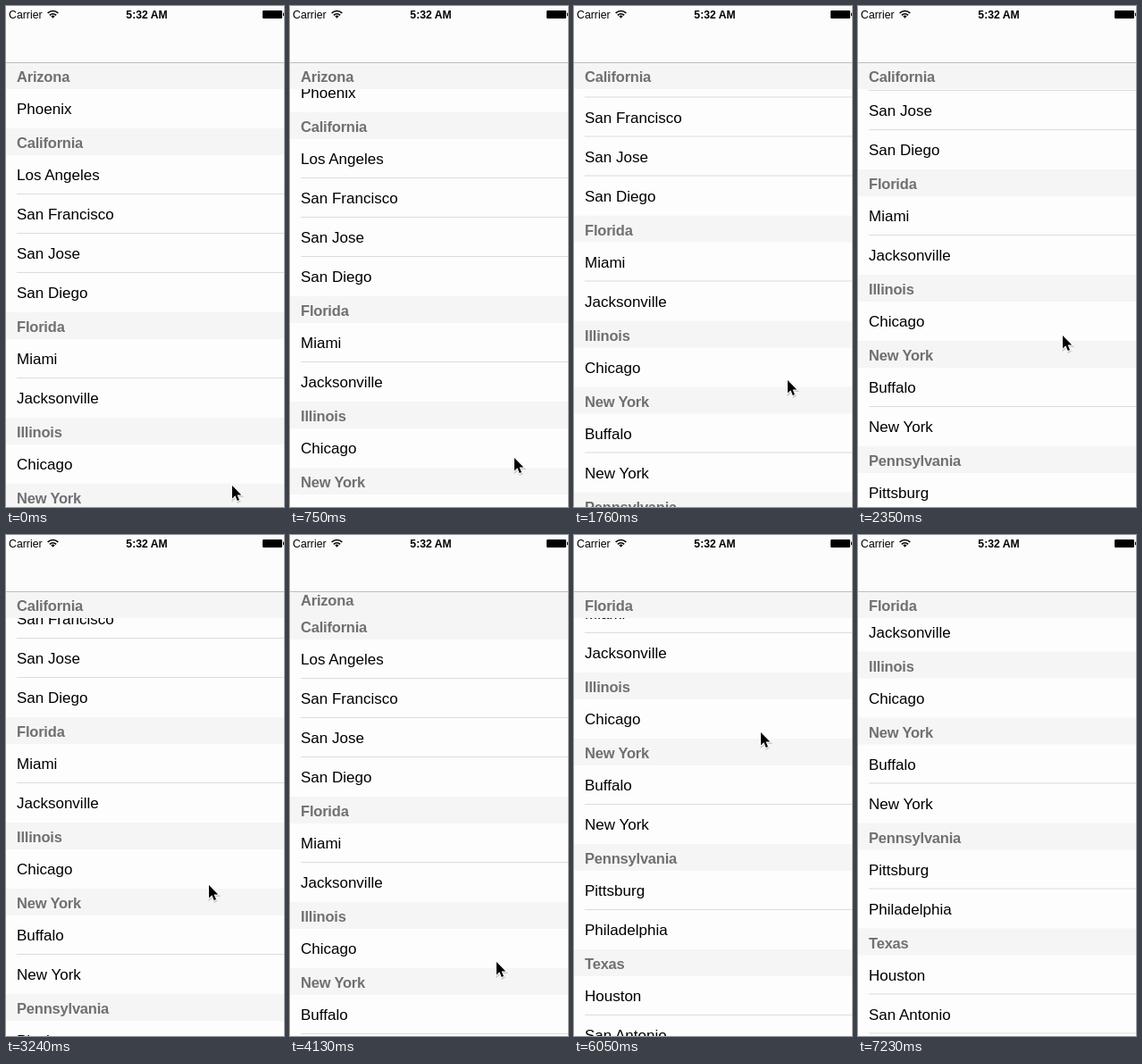
An HTML page for the animation above (7830 ms loop, 311x561 px).

```html
<!DOCTYPE html>
<html lang="en">
<head>
<meta charset="utf-8">
<title>City list</title>
<style>
  html, body { margin: 0; width: 100%; height: 100%; overflow: hidden; background: #fdfdfd; }
  svg { display: block; width: 311px; height: 561px; }
  text { font-family: "Liberation Sans", Arial, sans-serif; font-size: 17px; }
  .head text { font-size: 16.5px; font-weight: bold; letter-spacing: -.2px; fill: #707073; }
</style>
</head>
<body>
<svg viewBox="0 0 311 561">
  <rect width="311" height="561" fill="#fdfdfd"/>
  <g id="rows"></g>
  <g id="heads"></g>
  <rect width="311" height="63" fill="#fcfcfc"/>
  <rect y="63" width="311" height="1" fill="#bdbdbd"/>
  <text x="3" y="13.5" style="font-size:12.3px">Carrier</text>
  <g fill="none" stroke="#000" stroke-width="1.7">
    <path d="M46.7 8A8 8 0 0 1 58.3 8M48.9 10.3A5.2 5.2 0 0 1 56.1 10.3"/>
    <path d="M50.4 11.6A3 3 0 0 1 54.6 11.6L52.5 13.8Z" fill="#000" stroke="none"/>
  </g>
  <text x="157.5" y="13.5" text-anchor="middle" style="font-size:12.2px;font-weight:bold">5:32 AM</text>
  <rect x="287" y="5" width="22" height="9" rx="1.3"/>
  <path d="M310 7.7h1v3.6h-1z"/>
  <g id="cursor">
    <path d="M0 0V14.5L3.4 11.3L5.8 17L8 16L5.6 10.5H10.3Z" transform="translate(.6 1.6)" fill="#000" stroke="#000" stroke-width="2" opacity=".16"/>
    <path d="M0 0V14.5L3.4 11.3L5.8 17L8 16L5.6 10.5H10.3Z" stroke="#fff" stroke-width="1.8" stroke-linejoin="round" paint-order="stroke"/>
  </g>
</svg>
<script>
const LOOP = 7830, TOP = 63, HEAD = 30, ROW = 44;
const states = [
  ["Arizona", "Phoenix"],
  ["California", "Los Angeles", "San Francisco", "San Jose", "San Diego"],
  ["Florida", "Miami", "Jacksonville"],
  ["Illinois", "Chicago"],
  ["New York", "Buffalo", "New York"],
  ["Pennsylvania", "Pittsburg", "Philadelphia"],
  ["Texas", "Houston", "San Antonio", "Dallas"]
];
// Bursts of screen updates: first time, last time, number of updates.
const bursts = [
  [450, 1470, 8], [1620, 2350, 6], [2800, 3830, 8], [3980, 4130, 2],
  [4730, 5760, 8], [5910, 6640, 6], [6940, 7230, 3]
];
const LAST_STEP = 41;
// Drag path: step, scroll, cursor x, cursor y.
const drag = [
  [0, 0, 253, 537], [2, 8, 252, 519], [6, 64, 247, 462], [10, 108.5, 239, 419],
  [14, 160, 229, 369], [18, 139, 227, 392], [24, 50, 231, 478], [27, 120, 224, 408],
  [30, 232, 215, 297], [32, 283, 211, 245], [35, 315, 209, 213],
  [38, 330.5, 208, 195], [40, 330.5, 213, 265]
];

const byId = id => document.getElementById(id);

function add(parent, tag, attrs, content = "") {
  const node = document.createElementNS("http://www.w3.org/2000/svg", tag);
  for (const key in attrs) node.setAttribute(key, attrs[key]);
  node.textContent = content;
  return parent.appendChild(node);
}

let bottom = TOP;
const sections = states.map(([name, ...cities]) => {
  const top = bottom;
  bottom += HEAD;
  cities.forEach((city, i) => {
    add(byId("rows"), "text", { x: 12, y: bottom + 28 }, city);
    bottom += ROW;
    if (i < cities.length - 1)
      add(byId("rows"), "rect", { x: 12, y: bottom - 1, width: 299, height: 1, fill: "#dcdcdc" });
  });
  const node = add(byId("heads"), "g", { class: "head" });
  add(node, "rect", { width: 311, height: HEAD, fill: "#f5f5f5" });
  add(node, "text", { x: 12, y: 22 }, name);
  return { top, bottom, node };
});

function stepAt(time) {
  let step = 0;
  for (const [first, last, count] of bursts) {
    const gap = (last - first) / (count - 1);
    const done = Math.floor((time + 7 - first) / gap) + 1;
    step += Math.max(0, Math.min(count, done));
  }
  return step;
}

const slope = (i, col) =>
  (drag[i + 1][col] - drag[i][col]) / (drag[i + 1][0] - drag[i][0]);

// Harmonic mean keeps the curve from overshooting its keys.
function tangent(i, col) {
  if (i === 0) return slope(0, col);
  if (i === drag.length - 1) return slope(i - 1, col);
  const a = slope(i - 1, col), b = slope(i, col);
  return a * b > 0 ? 2 * a * b / (a + b) : 0;
}

function sample(step, col) {
  const end = drag.length - 1;
  if (step >= drag[end][0]) return drag[end][col];
  const i = drag.findIndex(key => key[0] > step) - 1;
  const span = drag[i + 1][0] - drag[i][0];
  const u = (step - drag[i][0]) / span, v = 1 - u;
  return drag[i][col] * (1 + 2 * u) * v * v + drag[i + 1][col] * u * u * (3 - 2 * u)
    + span * u * v * (tangent(i, col) * v - tangent(i + 1, col) * u);
}

const move = (node, x, y) => node.setAttribute("transform", `translate(${x} ${y})`);
const half = value => Math.round(value * 2) / 2;

function draw(time) {
  const step = stepAt(time);
  const scroll = half(sample(step, 1));
  move(byId("rows"), 0, -scroll);
  for (const { top, bottom, node } of sections)
    move(node, 0, Math.max(top - scroll, Math.min(TOP, bottom - scroll - HEAD)));
  move(byId("cursor"), Math.round(sample(step, 2)), Math.round(sample(step, 3)));
  byId("cursor").style.display = step < LAST_STEP ? "" : "none";
}

const start = performance.now();
function tick() {
  draw((performance.now() - start) % LOOP);
  requestAnimationFrame(tick);
}
tick();
</script>
</body>
</html>
```
